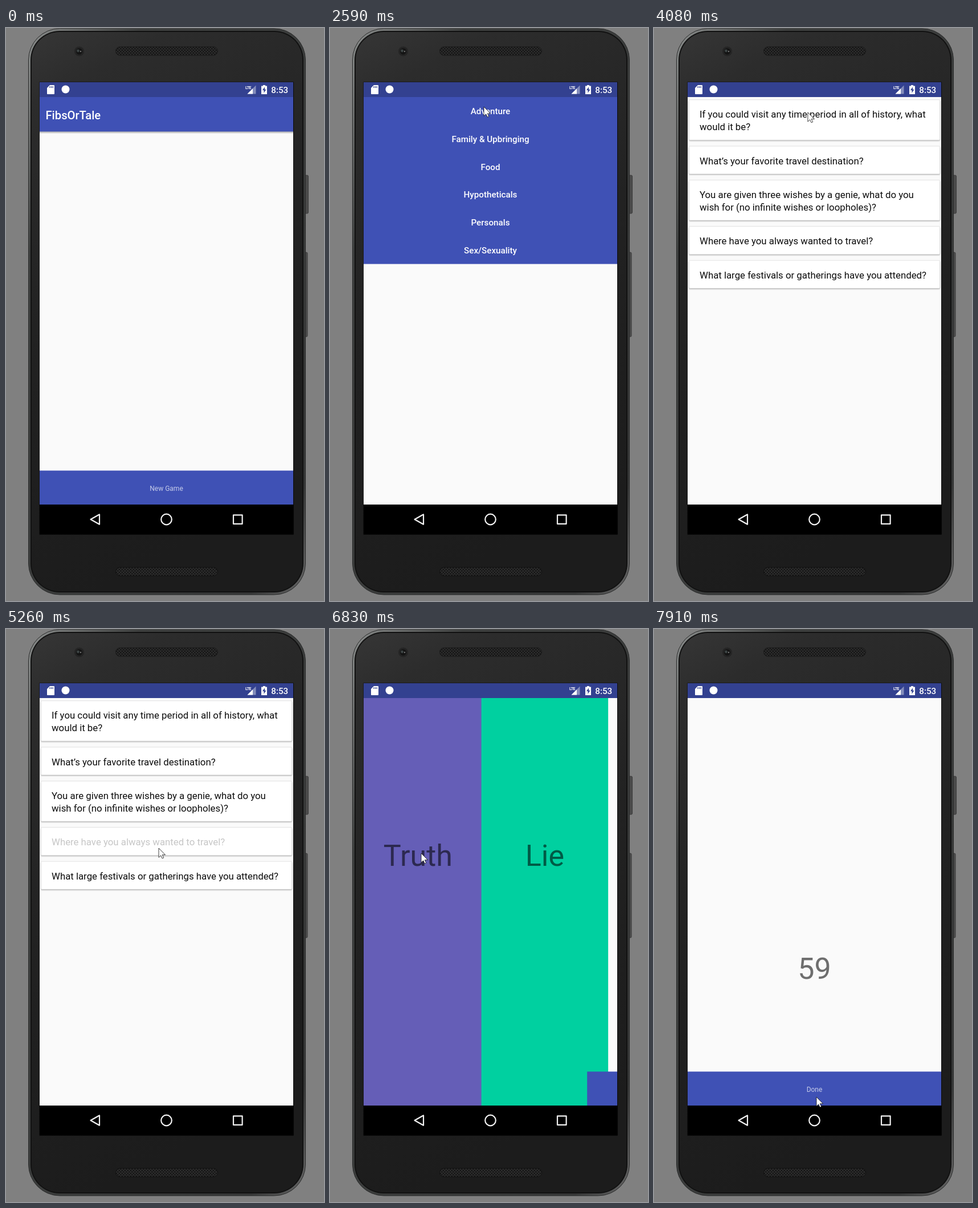
These frames come from a looping animation (558x1004 px, 7.99 s). An HTML page:

```html
<!DOCTYPE html>
<html lang="en">
<head>
<meta charset="utf-8">
<title>Party game on a phone</title>
<style>
  html, body { margin: 0; width: 100%; height: 100%; overflow: hidden; background: #808080; }
  svg { display: block; width: 100vw; height: 100vh; }
  text { font-family: Roboto, "Noto Sans", sans-serif; }
  .medium { font-weight: 500; fill: #fff; }
  .mid { text-anchor: middle; }
  .menu { font-size: 15.2px; }
  .action { font-size: 12px; fill: #c5cbe9; }
  .big { font-size: 52px; fill: #000; fill-opacity: .56; }
  .card rect { fill: #fff; stroke: #e4e4e4; stroke-width: .6; filter: drop-shadow(0 1.4px 1.2px rgba(0, 0, 0, .36)); }
  .card text { font-size: 16.8px; fill: #0c0c0c; }
  .card.picked text { fill: #c6c6c6; }
  .nav { fill: none; stroke: #f2f2f2; stroke-width: 2.2; stroke-linejoin: round; }
  .blue { fill: #3f51b5; }
  .side { fill: #4c4c4c; stroke: #333; stroke-width: .8; }
</style>
</head>
<body>
<svg viewBox="0 0 558 1004" preserveAspectRatio="none">
  <defs>
    <linearGradient id="rim" x1="0" y1="0" x2="1" y2="1">
      <stop offset="0" stop-color="#8b8e8d"/>
      <stop offset=".09" stop-color="#6a6c6b"/>
      <stop offset=".2" stop-color="#3e403f"/>
      <stop offset=".9" stop-color="#363737"/>
      <stop offset="1" stop-color="#686868"/>
    </linearGradient>
    <linearGradient id="body" x1="0" y1="0" x2=".25" y2="1">
      <stop offset="0" stop-color="#363636"/>
      <stop offset=".12" stop-color="#2c2c2c"/>
      <stop offset=".5" stop-color="#222"/>
      <stop offset="1" stop-color="#1c1c1c"/>
    </linearGradient>
    <linearGradient id="shade" x1="0" y1="0" x2="0" y2="1">
      <stop offset="0" stop-opacity=".32"/>
      <stop offset="1" stop-opacity="0"/>
    </linearGradient>
    <pattern id="mesh" width="5" height="5" patternUnits="userSpaceOnUse">
      <rect width="5" height="5" fill="#2b2b2b"/>
      <circle cx="1.3" cy="1.3" r="1.15" fill="#0b0b0b"/>
      <circle cx="3.8" cy="3.8" r="1.15" fill="#0b0b0b"/>
    </pattern>
    <clipPath id="content"><rect x="59" y="121" width="445" height="714"/></clipPath>
    <clipPath id="button"><rect x="59" y="775.5" width="445" height="60"/></clipPath>
  </defs>

  <!-- phone -->
  <rect width="558" height="1004" fill="#808080"/>
  <rect class="side" x="524" y="258" width="6.5" height="67" rx="2"/>
  <rect class="side" x="523" y="393" width="6" height="148" rx="2"/>
  <rect x="39.5" y="1" width="486" height="992" rx="55" fill="url(#rim)" stroke="#2b2c2c"/>
  <rect x="43" y="5" width="479" height="984" rx="51" fill="#111"/>
  <rect x="45" y="7" width="475" height="980" rx="49" fill="url(#body)"/>
  <rect x="192.5" y="33" width="179" height="15" rx="7.5" fill="url(#mesh)" stroke="#191919"/>
  <rect x="192.5" y="945" width="179" height="15" rx="7.5" fill="url(#mesh)" stroke="#111"/>
  <circle cx="128.5" cy="41" r="9" fill="#242424" stroke="#303030"/>
  <circle cx="128.5" cy="41" r="5.5" fill="#141414"/>
  <circle cx="126.5" cy="40" r="2.4" fill="#3c4343"/>
  <circle cx="131" cy="41" r="1.2" fill="#777"/>
  <rect x="58.5" y="94.5" width="446.5" height="793" fill="#0b0b0b"/>
  <rect x="59" y="121" width="445" height="714" fill="#fafafa"/>

  <g id="pages" clip-path="url(#content)">
    <g>
      <rect class="blue" x="59" y="121" width="445" height="60.5"/>
      <rect x="59" y="181.5" width="445" height="4" fill="url(#shade)"/>
      <text class="medium" x="69.5" y="159.7" font-size="20.2">FibsOrTale</text>
      <rect class="blue" x="59" y="775.5" width="445" height="60"/>
      <g id="buttonRipple" fill="#fff" clip-path="url(#button)">
        <rect x="59" y="775.5" width="445" height="60" opacity=".07"/>
        <circle id="buttonWave" cx="104.5" cy="781" r="0" opacity=".13"/>
      </g>
      <text class="action mid" x="281.5" y="810.8">New Game</text>
    </g>
    <g id="menu">
      <rect class="blue" x="59" y="121" width="445" height="292.5"/>
      <rect id="rowRipple" x="59" y="121" width="445" height="48.75" fill="#fff" opacity=".07"/>
    </g>
    <g id="cards"></g>
    <g>
      <rect x="59" y="121" width="223" height="714" fill="#655eb7"/>
      <rect x="281.5" y="121" width="222.5" height="714" fill="#00d0a0"/>
      <text class="big mid" x="170.25" y="414.5">Truth</text>
      <text class="big mid" x="392.75" y="414.5">Lie</text>
    </g>
    <g>
      <text class="big mid" id="counter" x="281.5" y="613">60</text>
      <rect class="blue" x="59" y="775.5" width="445" height="60"/>
      <text class="action mid" x="281.5" y="810.8">Done</text>
    </g>
  </g>

  <!-- status bar -->
  <rect x="59" y="95" width="445" height="26" fill="#334190"/>
  <g fill="#fff">
    <path d="M77 100h7q1 0 1 1v14q0 1-1 1H73q-1 0-1-1v-10z"/>
    <circle cx="104.5" cy="107.5" r="7"/>
    <path d="M438.5 100.5v15h-15z" opacity=".4"/>
    <path d="M433 106v9.500h-9.500z"/>
    <path d="M451 100h4v1.500h3v14.500h-10v-14.500h3z"/>
    <text x="420" y="106.7" font-size="7" font-weight="700" letter-spacing="-.4">LTE</text>
    <text class="medium" x="465.3" y="113.8" font-size="15.2">8:53</text>
  </g>
  <path d="M77 102v3M79.600 102v3M82.200 102v3" stroke="#334190" stroke-width="1.2"/>
  <path d="M454 103.300l-4 5.700h2.500v4.700l4-6h-2.500z" fill="#334190"/>

  <!-- navigation bar -->
  <rect x="59" y="835" width="445.5" height="52.5"/>
  <g class="nav">
    <path d="M148.500 861L164 852.300V869.700Z"/>
    <circle cx="281.5" cy="861" r="9.3"/>
    <rect x="399" y="853.3" width="15.6" height="15.6"/>
  </g>

  <path id="cursor" d="M0 0V16.300L3.700 12.800 6.200 18 8.700 16.900 6.300 11.700H11.500Z" fill="#fff" stroke="#111" stroke-width=".8"/>
</svg>

<script>
const LOOP = 7990, WIDTH = 445, SLIDE = 450, PARALLAX = 0.3;
const $ = id => document.getElementById(id);

function add(parent, tag, attrs, content = '') {
  const node = document.createElementNS(parent.namespaceURI, tag);
  for (const key in attrs) node.setAttribute(key, attrs[key]);
  node.textContent = content;
  return parent.appendChild(node);
}

['Adventure', 'Family & Upbringing', 'Food', 'Hypotheticals', 'Personals', 'Sex/Sexuality']
  .forEach((label, i) => add($('menu'), 'text',
    { class: 'medium menu mid', x: 281.5, y: 151 + i * 48.75 }, label));

let cardTop = 126;
const cards = [
  ['If you could visit any time period in all of history, what', 'would it be?'],
  ['What’s your favorite travel destination?'],
  ['You are given three wishes by a genie, what do you', 'wish for (no infinite wishes or loopholes)?'],
  ['Where have you always wanted to travel?'],
  ['What large festivals or gatherings have you attended?']
].map(lines => {
  const card = add($('cards'), 'g', { class: 'card' });
  const height = 26.8 + lines.length * 21.7;
  add(card, 'rect', { x: 61.5, y: cardTop, width: 440, height, rx: 1.5 });
  lines.forEach((line, i) => add(card, 'text', { x: 80, y: cardTop + 31.3 + i * 21.7 }, line));
  cardTop += height + 11;
  return card;
});

const bursts = [
  [340, 800, 7], [1180, 1820, 9], [2050, 2200, 3], [2430, 2590, 3], [3070, 3530, 7],
  [4010, 4560, 8], [5260, 5260, 1], [5410, 6190, 11], [6830, 7290, 7], [7600, 7910, 5]
];

// Time of the latest recorded change at or before t.
function recorded(t) {
  const burst = bursts.findLast(([start]) => t >= start);
  if (!burst) return 0;
  const [start, end, count] = burst;
  if (t >= end) return end;
  const step = (end - start) / (count - 1);
  return start + Math.floor((t - start) / step + 0.01) * step;
}

const pages = [...$('pages').children];
const pageStarts = [-SLIDE, 1314, 3057, 5405, 6816];

// Pointer moves: [start, end, x, y]; each leaves from where the last one stopped.
const moves = [
  [340, 340, 440, 983], [340, 800, 267, 798], [1420, 1820, 258, 226],
  [1975, 2200, 264, 168], [2350, 2590, 270, 138], [3935, 4560, 268, 384],
  [5800, 6190, 160, 393], [7523, 7910, 285, 820]
];

const clamp = v => Math.min(1, Math.max(0, v));
const easeOut = v => 1 - (1 - v) ** 4;
const easeInOut = v => v * v * (3 - 2 * v);
const show = (node, on) => node.setAttribute('visibility', on ? 'inherit' : 'hidden');

function drawPages(t) {
  const entered = pageStarts.map(start => easeOut(clamp((t - start) / SLIDE)));
  pages.forEach((page, i) => {
    const leaving = entered[i + 1] ?? 0;
    const x = WIDTH * (1 - entered[i] - PARALLAX * leaving);
    page.setAttribute('transform', `translate(${x.toFixed(1)} 0)`);
    show(page, entered[i] > 0 && leaving < 1);
  });
}

function drawCursor(t) {
  let x = 0, y = 0;
  for (const [start, end, toX, toY] of moves) {
    if (t < start) break;
    const k = end > start ? easeInOut(clamp((t - start) / (end - start))) : 1;
    x += (toX - x) * k;
    y += (toY - y) * k;
  }
  $('cursor').setAttribute('transform', `translate(${x.toFixed(1)} ${y.toFixed(1)})`);
  show($('cursor'), t >= moves[0][0]);
}

function draw(t) {
  drawPages(t);
  drawCursor(t);
  show($('buttonRipple'), t >= 1180);
  $('buttonWave').setAttribute('r', 34 * Math.max(0, (t - 1180) / 160));
  show($('rowRipple'), t >= 3070);
  cards[3].classList.toggle('picked', t >= 5260);
  $('counter').textContent = t >= 7830 ? '59' : '60';
}

function frame() {
  draw(recorded(performance.now() % LOOP));
  requestAnimationFrame(frame);
}
frame();
</script>
</body>
</html>
```
